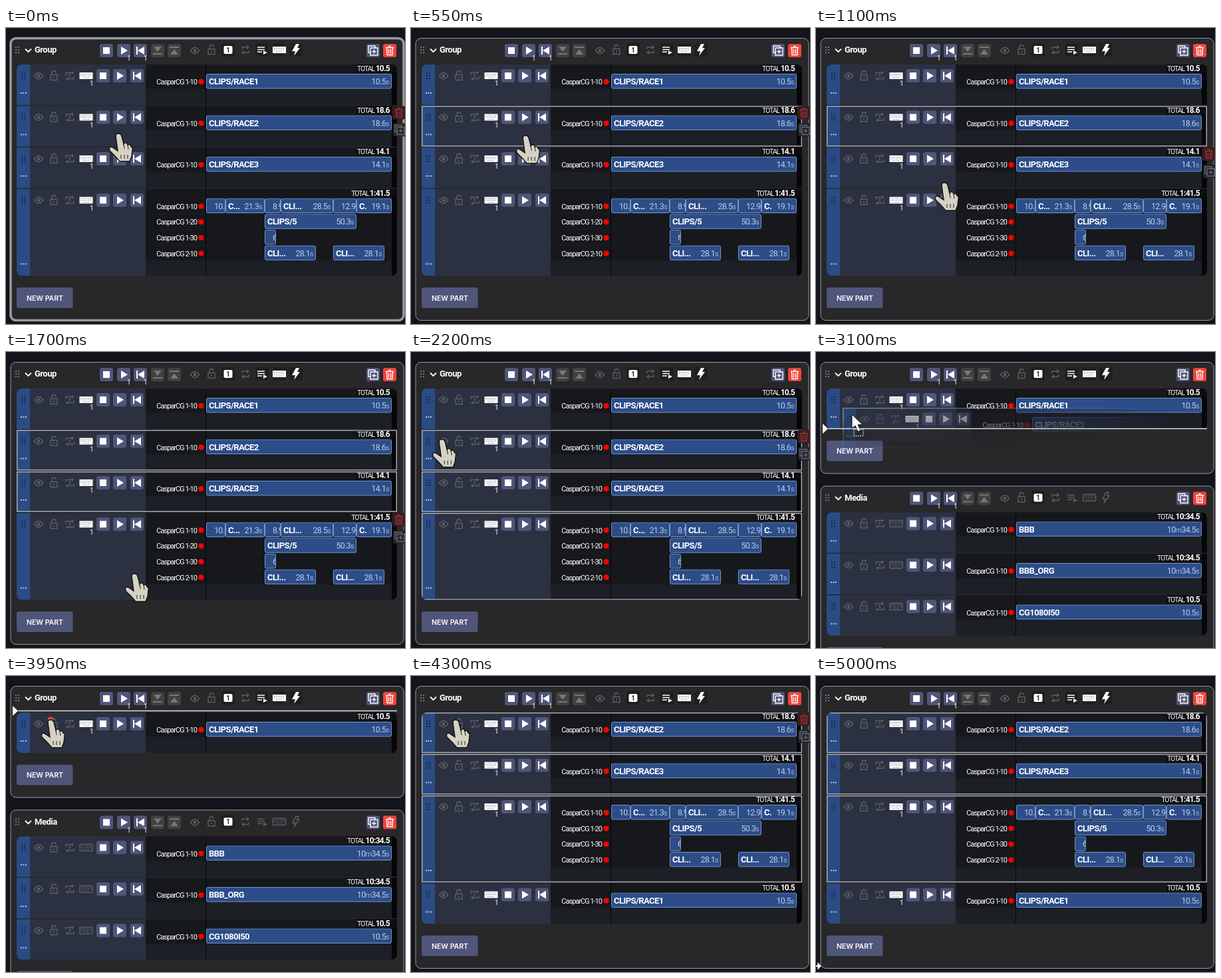
Animation of 600 by 446 pixels, one loop 5050 ms. Source, as an HTML page:

```html
<!DOCTYPE html>
<html lang="en">
<head>
<meta charset="utf-8">
<title>Reordering parts</title>
<style>
html, body { margin: 0; width: 100%; height: 100%; overflow: hidden; background: #14141c; }
svg { display: block; }
text { font-family: Roboto, "Liberation Sans", sans-serif; fill: #fff; white-space: pre; }
.label { font-size: 11px; letter-spacing: -1px; text-anchor: end; }
.name { font-size: 13px; font-weight: 700; letter-spacing: -.55px; }
.time { font-size: 12.5px; letter-spacing: -.7px; fill: #bccbe6; }
.unit { font-size: 11px; fill: #9db2d8; }
.total { font-size: 10.5px; letter-spacing: -1.1px; text-anchor: end; }
.total tspan { font-size: 12px; font-weight: 700; letter-spacing: -.7px; }
.title { font-size: 13px; font-weight: 700; letter-spacing: -.5px; }
.badge { font-size: 10px; }
.button { font: 600 10.5px Inter, Roboto, sans-serif; }
.line { fill: none; stroke: currentColor; stroke-width: 1.4; }
.sel { display: none; fill: none; stroke: #aeafb3; stroke-width: 1.4; }
.on .sel { display: inline; }
</style>
</head>
<body>
<svg id="stage" width="600" height="446" viewBox="0 0 600 446"></svg>
<script>
const GREY = '#5c5e65', WHITE = '#fff', BLUE = '#50557a', LOOP = 5050;
const stage = document.getElementById('stage');
const $ = id => document.getElementById(id);

const rect = (x, y, w, h, fill, more = '') =>
  `<rect x="${x}" y="${y}" width="${w}" height="${h}" fill="${fill}" ${more}/>`;
const text = (cls, x, y, s, more = '') => `<text class="${cls}" x="${x}" y="${y}" ${more}>${s}</text>`;
const solid = d => `<path fill="currentColor" d="${d}"/>`;
const line = d => `<path class="line" d="${d}"/>`;
const icon = (id, x, y, color = WHITE) => `<g transform="translate(${x} ${y})" color="${color}">${icons[id]}</g>`;
const button = (id, x, y, fill = BLUE, color = WHITE) =>
  rect(x - 10, y - 10, 20, 20, fill, 'rx="3"') + icon(id, x, y, color);

const keys = 'M-8-2.5H8M-8 0H8';
const icons = {
  stop: solid('M-5-5H5V5H-5z'),
  play: solid('M-4-6L6 0-4 6z'),
  prev: solid('M-6-6h2V6h-2zM6-6V6L-4 0z'),
  down: solid('M-6-6H6L0 2zM-7 4H7v2H-7z'),
  up: solid('M-6 6H6L0-2zM-7-4H7v-2H-7z'),
  eye: line('M-6.5 0Q0-9 6.5 0Q0 9-6.5 0z') + '<circle r="2.3" fill="currentColor"/>',
  lock: line('M-5-1.5H5V6.5H-5zM-3-1.5V-4.5a3 3 0 0 1 6 0') + solid('M-1 1.5h2v2h-2z'),
  loop: line('M-5-1V-4H4M2-6.5L5-4 2-1.5M5 1V4H-4M-2 1.5L-5 4-2 6.5'),
  loopOne: line('M-6-1V-4.5H5M3-6.5L5-4.5 3-2.5M6 1V4.5H-5M-3 2.5L-5 4.5-3 6.5M-1.5-1.5H0V2.5'),
  list: line('M-7-4H4M-7-.5H4M-7 3H0') + solid('M2 1L8 4 2 7z'),
  keys: solid('M-10-5H10V5H-10z') +
    `<path d="${keys}M-5 3H5" stroke="#6a6c74" stroke-width="1.2" stroke-dasharray="1.2 1.5"/>`,
  keysOff: '<rect class="line" x="-9.5" y="-5" width="19" height="10" rx="1"/>' +
    `<path d="${keys}M-4 2.5H4" stroke="currentColor" stroke-width="1.3" stroke-dasharray="1.5 1.5"/>`,
  bolt: solid('M0-9H5L2-3H6L-3 9-1 2H-6z'),
  boltOff: line('M0-8H4L1.5-3H5L-3 8-1 2H-5z'),
  one: rect(-6.5, -6, 13, 12, WHITE, 'rx="2"') +
    text('badge', 0, 3.8, '1', 'text-anchor="middle" font-weight="700" style="fill:#222"'),
  copy: line('M-3 3H-7V-7H3V-3M-4-4H7V7H-4zM1.5-1.5V4.5M-1.5 1.5H4.5'),
  trash: line('M-6-4.5H6M-2-6.5H2M-4.5-4L-4 6.5H4L4.5-4M-1.5-2V4.5M1.5-2V4.5')
};

const dots = (x, y, color) => [0, 1, 2, 3, 4, 5].map(i =>
  rect(x + i % 2 * 4 - 3, y + (i >> 1) * 4 - 5, 2, 2, color)).join('');

function header(title, active) {
  const toggle = (id, x) => active ? rect(x - 10, 23, 20, 20, '#211f1d', 'rx="3"') + icon(id, x, 33)
    : icon(id + 'Off', x, 33, GREY);
  return dots(17, 33, '#77777a') +
    '<path d="M29 31.5L33.5 36 38 31.5" fill="none" stroke="#fff" stroke-width="1.8"/>' +
    text('title', 43, 37, title) +
    button('stop', 151, 34) + button('play', 177, 34) + button('prev', 202, 34) +
    text('badge', 182, 49, '1') + text('badge', 207, 49, '1') +
    button('down', 228, 34, '#414143', '#777') + button('up', 253, 34, '#414143', '#777') +
    icon('eye', 284, 34, GREY) + icon('lock', 309, 33, GREY) +
    rect(324, 23, 20, 20, '#211f1a', 'rx="3"') + icon('one', 334, 33) +
    icon('loop', 360, 33, GREY) +
    (active ? rect(375, 23, 20, 20, '#211f1d', 'rx="3"') : '') +
    icon('list', 385, 33, active ? WHITE : GREY) +
    toggle('keys', 411) + toggle('bolt', 436) +
    button('copy', 552, 34) + button('trash', 577, 34, '#f0443b');
}

// A clip is [left, right, name, duration]; without a name the duration sits near the left edge.
function clip([x, end, name, time], y) {
  const w = end - x;
  const t = time.replace(/[ms]/g, u => `<tspan class="unit">${u}</tspan>`);
  return `<svg x="${x}" y="${y}" width="${w}" height="23">` +
    rect(.5, .5, w - 1, 21.5, '#2c4d88', 'rx="2" stroke="#7595c8"') +
    text('name', 4, 16, name) +
    (name ? text('time', w - 4, 16, t, 'text-anchor="end"') : text('time', 12, 16, t)) + '</svg>';
}

// A layer is [label, ...clips].
function row(total, layers, hot) {
  const h = layers.length > 1 ? 131 : 61;
  let s = rect(16, 0, 20, h, '#2b4b85') + rect(36, 0, 174, h, '#2b3140') +
    rect(210, 0, 370, h, '#1d1f27') + rect(580, 0, 8, h, '#07070a') + rect(210, 0, 370, 14, '#17181c');
  layers.forEach((_, i) => s += rect(210, 14 + i * 23.7, 370, 22.7, '#17181c'));
  s += rect(300, 0, 1, h, '#060608') + rect(total.length > 6 ? 513 : 527, 0, 61, 12, '#0d0d11') +
    dots(26, 17, '#15264a') +
    [22, 25.5, 29].map(x => rect(x, h - 19, 2, 2, '#b8c6e2')).join('') +
    icon('eye', 49, 17, GREY) + icon('lock', 72, 17, GREY) + icon('loopOne', 96, 17, GREY) +
    icon(hot ? 'keys' : 'keysOff', 120.5, 17, hot ? WHITE : GREY) +
    (hot ? text('badge', 126, 32, '1') : '') +
    button('stop', 146, 17) + button('play', 171, 17) + button('prev', 197, 17) +
    text('total', 577, 10, `TOTAL <tspan>${total}</tspan>`);
  layers.forEach(([label, ...clips], i) => {
    const y = 14 + i * 23.7;
    s += text('label', 287, y + 16, 'CasparCG ' + label) +
      `<circle cx="293.5" cy="${y + 12}" r="4" fill="#f00"/>` +
      clips.map(c => clip(c, y)).join('');
  });
  return s + `<rect class="sel" x="16.7" y=".7" width="570.6" height="${h - 1.4}"/>`;
}

const single = (name, time, total, hot = true) => row(total, [['1-10', [301, 580, name, time]]], hot);
const newPart = y => rect(16, y, 84.5, 31, BLUE, 'rx="3"') + text('button', 31, y + 19.5, 'NEW PART');
const panel = (id, h) => `<rect id="${id}" x="7" y="15.5" width="591" height="${h}" rx="8" fill="#282729" stroke="#9b9b9e"/>`;

const parts = [
  single('CLIPS/RACE1', '10.5s', '10.5'),
  single('CLIPS/RACE2', '18.6s', '18.6'),
  single('CLIPS/RACE3', '14.1s', '14.1'),
  row('1:41.5', [
    ['1-10', [301, 330, '', '10.5s'], [330, 389, 'C...', '21.3s'], [389, 413, '', '8.9s'],
      [413, 492, 'CLI...', '28.5s'], [492, 527, '', '12.9s'], [527, 580, 'C.', '19.1s']],
    ['1-20', [389, 527, 'CLIPS/5', '50.3s']],
    ['1-30', [389, 406, '', '6.4s']],
    ['2-10', [389, 466, 'CLI...', '28.1s'], [492, 569, 'CLI...', '28.1s']]
  ], true)
];
const strides = [62.5, 62.5, 62.5, 132.5];
const media = [['BBB', '10m34.5s', '10:34.5'], ['BBB_ORG', '10m34.5s', '10:34.5'], ['CG1080I50', '10.5s', '10.5']];
const at = (x, y, s, id = '') => `<g id="${id}" transform="translate(${x} ${y})">${s}</g>`;

stage.innerHTML = `<defs>
  <clipPath id="round"><rect id="list" x="16" y="55" width="572" height="319" rx="8"/></clipPath>
  <clipPath id="roundMedia"><rect x="16" y="55" width="572" height="186" rx="8"/></clipPath>
  <radialGradient id="fade" gradientUnits="userSpaceOnUse" cx="0" cy="0" r="1" gradientTransform="translate(30 10) scale(500 56)">
    <stop stop-color="#fff" stop-opacity=".75"/><stop offset="1" stop-color="#fff" stop-opacity="0"/>
  </radialGradient>
  <mask id="soft" maskUnits="userSpaceOnUse" x="0" y="0" width="600" height="62">${rect(0, 0, 600, 62, 'url(#fade)')}</mask>
  </defs>` +
  panel('frame', 425) + header('Group', true) +
  `<g clip-path="url(#round)">${parts.map((p, i) => at(0, 0, p, 'part' + i)).join('')}</g>` +
  at(0, 0, newPart(0), 'add') +
  at(0, 0, panel('', 300) + header('Media', false) + '<g clip-path="url(#roundMedia)">' +
    media.map((m, i) => at(0, 55 + i * 62.5, single(...m, false))).join('') + '</g>' + newPart(258), 'media') +
  at(0, 0, button('trash', 591, 10, '#3f1a20', '#8a3a3c') + button('copy', 592, 36, '#23242c', '#66676f'), 'hover') +
  at(0, 0, `<g class="on" mask="url(#soft)">${parts[1]}</g>`, 'ghost') +
  at(0, 0, '<path d="M10-7.5L18 0 10 7.5z" fill="#fff"/>' + rect(18, -.7, 570, 1.4, '#e8e8e8'), 'drop') +
  '<circle id="dot" cx="67" cy="66" r="4.5" fill="#d8483f"/>' +
  at(0, 0, '<path d="M-4 3Q-4-1 0-1Q4-1 5 3L8 15Q9 12 12 13Q14 14 14 16Q18 14 19 19Q22 19 21 24L20 33 17 41H2L-4 34-13 25Q-15 19-10 19L-1 25z" fill="#d6d2c3" stroke="#111" stroke-width="1.4"/>' +
    '<path d="M8 15L9 22M14 16L15 23M4 31V37M9 31V37M14 31V37" fill="none" stroke="#222"/>', 'hand') +
  at(0, 0, '<path d="M0 0V21L5 17 9 26 13 24 9 15.5H16z" fill="#fff" stroke="#111"/>' +
    '<rect x="3" y="22.5" width="14" height="10" fill="none" stroke="#ddd" stroke-dasharray="2 1"/>', 'arrow') +
  '<path id="resize" d="M-4 435.5H2V430.5L8.5 437 2 443.5V438.5H-4z" fill="#fff" stroke="#111" stroke-width=".8"/>';

// Pointer tip: [ms, x, y]
const path = [[0, 169, 160], [450, 169, 160], [850, 189, 179], [1100, 193, 234], [1400, 193, 234],
  [1700, 193, 335], [1900, 193, 337], [2250, 38, 121], [2650, 38, 121], [3100, 54, 94],
  [3150, 54, 94], [3550, 67, 67], [4550, 67, 67], [4800, -40, 390], [LOOP, -40, 390]];

function tip(t) {
  const i = path.findIndex(p => p[0] > t);
  const [t0, x0, y0] = path[i - 1], [t1, x1, y1] = path[i];
  const k = (t - t0) / (t1 - t0), e = k * k * (3 - 2 * k);
  return [x0 + (x1 - x0) * e, y0 + (y1 - y0) * e];
}

const show = (id, on) => $(id).style.display = on ? '' : 'none';
const move = (id, x, y) => $(id).setAttribute('transform', `translate(${x} ${y})`);
const set = (id, name, v) => $(id).setAttribute(name, v);

function draw(t) {
  const [x, y] = tip(t);
  const folded = t >= 2600 && t < 4000, dragging = t >= 2600 && t < 3950;
  const order = folded ? [0] : t < 4000 ? [0, 1, 2, 3] : [1, 2, 3, 0];
  const selectAt = [Infinity, 350, 1350, 1850];
  let top = 55, hoverTop = -100;

  parts.forEach((_, i) => {
    show('part' + i, order.includes(i));
    $('part' + i).classList.toggle('on', t >= selectAt[i]);
  });
  for (const i of order) {
    move('part' + i, 0, top);
    if (y >= top && y < top + strides[i] && x > 16) hoverTop = top;
    top += strides[i];
  }
  if (folded) hoverTop = 117.5;
  const end = top - 1.5;
  set('list', 'height', end - 55);
  set('frame', 'height', end + 51.5);
  set('frame', 'stroke-width', t < 350 ? 3.5 : 1);
  move('add', 0, end + 17.5);
  move('media', 0, end + 70.5);

  show('hover', t < 2700 || t >= 4000 && t < 4600);
  move('hover', 0, hoverTop);
  show('drop', folded);
  move('drop', 0, y < 86 ? 52.5 : 115.5);
  show('ghost', dragging);
  move('ghost', x - 30, y - 10);
  show('dot', t >= 3950 && t < 4150);
  show('hand', !dragging && t < 4800);
  move('hand', x, y);
  show('arrow', dragging);
  move('arrow', x, y);
  show('resize', t >= 5000);
}

const start = performance.now();
function tick(now) {
  draw(Math.max(0, now - start) % LOOP);
  requestAnimationFrame(tick);
}
draw(0);
requestAnimationFrame(tick);
</script>
</body>
</html>
```
